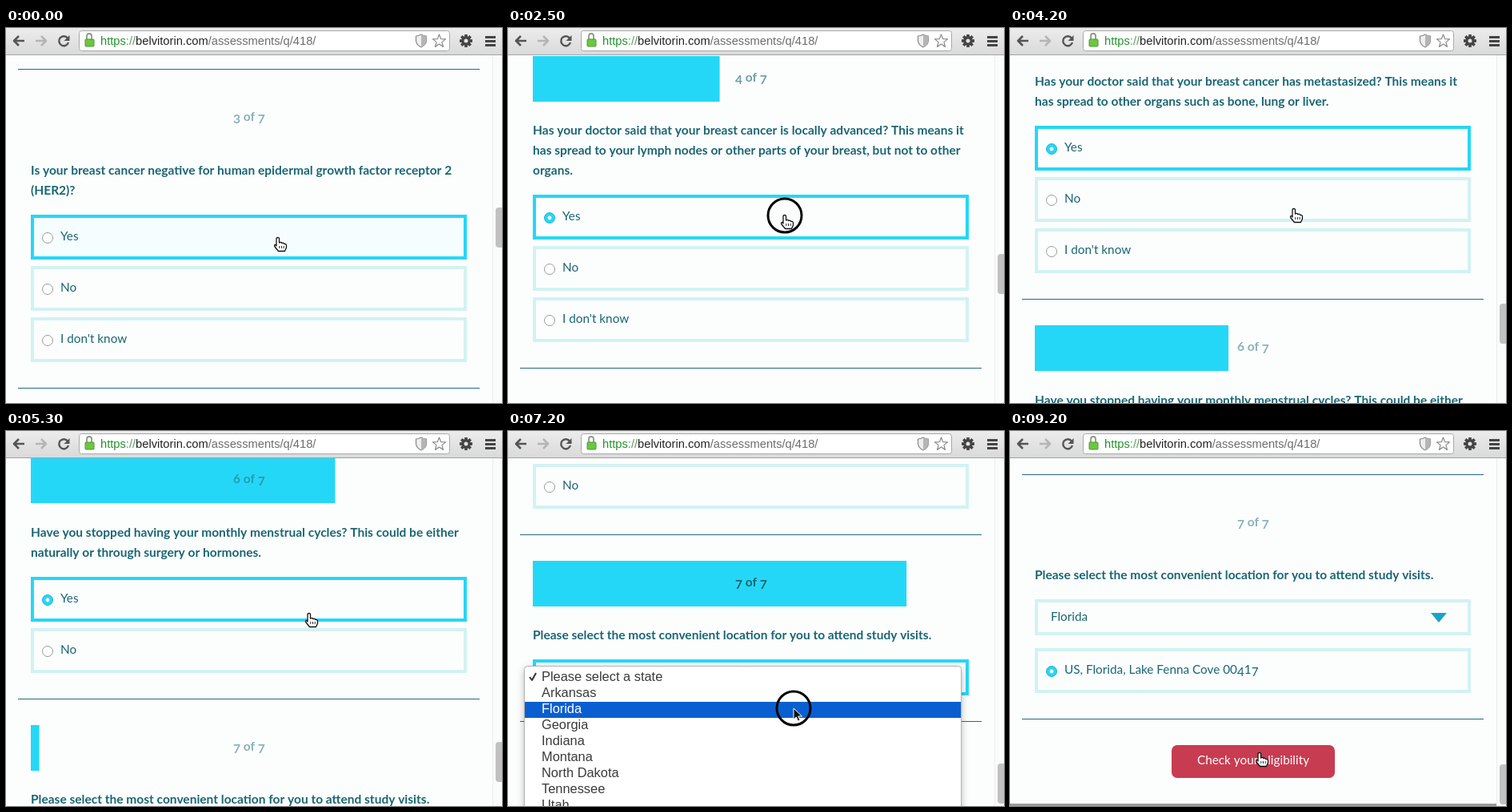
Animation, 620 px wide and 468 px high, one loop 9300 ms. Source, as an HTML page with a canvas:

```html
<!DOCTYPE html>
<html lang="en">
<head>
<meta charset="utf-8">
<title>Screening form</title>
<style>
html, body { margin: 0; width: 100%; height: 100%; overflow: hidden; background: #fcfefe; }
canvas { display: block; }
</style>
</head>
<body>
<canvas id="stage" width="620" height="468"></canvas>
<script>
const c = document.getElementById('stage').getContext('2d');
const LOOP = 9300, STEP = 100;
const TEAL = '#1a6572', CYAN = '#25d7f7', PAPER = '#fcfefe';
const BOLD = 'bold 15.53px Lato, sans-serif', BODY = '15.3px Lato, sans-serif';
const SYSTEM = '16.4px "Liberation Sans", Arial, sans-serif';
const URL_FONT = '14.7px "Liberation Sans", Arial, sans-serif';
const LINE = 24.8;

const sections = [
  { no: 3, y: 51, answers: 3, text: ['Is your breast cancer negative for human epidermal growth factor receptor 2', '(HER2)?'] },
  { no: 4, y: 448.6, answers: 3, text: ['Has your doctor said that your breast cancer is locally advanced? This means it',
    'has spread to your lymph nodes or other parts of your breast, but not to other', 'organs.'] },
  { no: 5, y: 871, answers: 3, text: ['Has your doctor said that your breast cancer has metastasized? This means it',
    'has spread to other organs such as bone, lung or liver.'] },
  { no: 6, y: 1269, answers: 2, text: ['Have you stopped having your monthly menstrual cycles? This could be either',
    'naturally or through surgery or hormones.'] },
  { no: 7, y: 1602.6, answers: 0, text: ['Please select the most convenient location for you to attend study visits.'] }
];
const answers = ['Yes', 'No', "I don't know"];
const states = ['Please select a state', 'Arkansas', 'Florida', 'Georgia', 'Indiana', 'Montana', 'North Dakota', 'Tennessee', 'Utah'];

// Timeline in ms
const answered = [400, 2400, 3800, 5100, 8200];
const scrollStops = [0, 447, 870, 1269, 1474, 1549];
const OPEN = 6600, CLOSE = 7300;
const clicks = [...answered, 6500, 7200];
const pointer = [[0, 340, 262], [1300, 340, 262], [1600, 346, 234], [3300, 346, 234], [3600, 355, 226],
  [4700, 355, 226], [4900, 379, 228], [6000, 379, 228], [6400, 360, 306], [6600, 360, 306],
  [6900, 357, 346], [7400, 357, 346], [7900, 350, 370], [8400, 350, 370], [9100, 312, 402]];

const ramp = (t, start, length) => {
  const p = Math.min(1, Math.max(0, (t - start) / length));
  return 0.5 - Math.cos(Math.PI * p) / 2;
};

function pointerAt(t) {
  let [, x, y] = pointer[0];
  for (let i = 1; i < pointer.length; i++) {
    const [t0, x0, y0] = pointer[i - 1], [t1, x1, y1] = pointer[i];
    const p = ramp(t, t0, t1 - t0);
    x += (x1 - x0) * p;
    y += (y1 - y0) * p;
  }
  return [x, y];
}

function mix(a, b, p) {
  return 'rgb(' + a.map((v, i) => Math.round(v + (b[i] - v) * p)).join() + ')';
}

function rect(x, y, w, h, fill) {
  c.fillStyle = fill;
  c.fillRect(x, y, w, h);
}

function round(x, y, w, h, r, fill, stroke) {
  c.beginPath();
  c.roundRect(x, y, w, h, r);
  if (fill) { c.fillStyle = fill; c.fill(); }
  if (stroke) { c.strokeStyle = stroke; c.stroke(); }
}

function disc(x, y, r, fill, stroke, width = 1) {
  c.beginPath();
  c.arc(x, y, r, 0, 7);
  if (fill) { c.fillStyle = fill; c.fill(); }
  if (stroke) { c.strokeStyle = stroke; c.lineWidth = width; c.stroke(); }
}

function text(s, x, y, font, fill = TEAL) {
  c.font = font;
  c.fillStyle = fill;
  c.fillText(s, x, y);
  return x + c.measureText(s).width;
}

// Old-style figures: some digits hang below the baseline
function oldStyle(s, x, y, font) {
  for (const part of s.split(/([34579])/)) {
    x = text(part, x, /^[34579]$/.test(part) ? y + 3 : y, font);
  }
}

// Path data drawn at an offset
function shape(d, x, y, fill, stroke, width = 1) {
  const path = new Path2D(d);
  c.save();
  c.translate(x, y);
  c.lineJoin = 'round';
  if (fill) { c.fillStyle = fill; c.fill(path); }
  if (stroke) { c.strokeStyle = stroke; c.lineWidth = width; c.stroke(path); }
  c.restore();
}

function frame(y, h, glow) {
  c.strokeStyle = mix([210, 242, 243], [37, 215, 247], glow);
  c.lineWidth = 4;
  c.strokeRect(33, y + 2, 541, h - 4);
}

function option(label, y, glow, checked) {
  if (!checked) rect(35, y + 4, 537, 48, mix([252, 254, 254], [245, 253, 254], glow));
  frame(y, 56, glow);
  if (checked) {
    disc(52, y + 29, 6.5, CYAN, '#1fb4d6');
    disc(52, y + 29, 2.4, '#f4fdff');
  } else {
    disc(52, y + 29, 6.5, '#fff', '#9a9a9a');
  }
  oldStyle(label, 68, y + 32, BODY);
}

const rule = y => rect(15, y, 577, 1, '#2a6780');

function section(s, i, t) {
  const first = i === 0, prev = first ? 0 : answered[i - 1], done = answered[i];
  const y = Math.round(s.y), top = Math.round(s.y + 132 + LINE * s.text.length);
  rule(y);
  if (!first) {
    const size = ramp(t, prev + 160, 415) - ramp(t, done + 160, 415);
    rect(31, y + 33, 545 * (s.no - 1) / 7 * size, 57, CYAN);
    c.globalAlpha = 0.5 + 0.5 * (ramp(t, prev + 600, 250) - ramp(t, done, 150));
  } else {
    c.globalAlpha = 0.5;
  }
  oldStyle(s.no + ' of 7', 284, y + 65, BOLD);
  c.globalAlpha = 1;
  s.text.forEach((line, k) => text(line, 31, top - 25 * (s.text.length - k), BOLD));

  const glow = (first ? 1 : ramp(t, prev + 540, 300)) - ramp(t, done + 700, 200);
  for (let k = 0; k < s.answers; k++) {
    option(answers[k], top + 64 * k, k ? 0 : glow, !k && t >= done + 100);
  }
}

function locationForm(t) {
  const top = 1759, grown = ramp(t, 7400, 400), end = 1836 + 72 * grown;
  frame(top, 45, ramp(t, 6200, 200) - ramp(t, 7700, 200));
  text(t < CLOSE ? states[0] : states[2], 51, top + 27, BODY);
  shape('M0 0H20L10 12Z', 526, top + 17, '#1ba3c6');
  c.globalAlpha = grown;
  if (grown) option('US, Florida, Lake Fenna Cove 00417', top + 61, ramp(t, 7700, 200) - ramp(t, 8400, 200), t >= 8300);
  c.globalAlpha = 1;
  rule(end);
  round(202, end + 33, 204, 41, 7, t >= 9200 ? '#c73c50' : '#d5455a');
  c.textAlign = 'center';
  text('Check your eligibility', 304, end + 57, BODY, '#fff');
  c.textAlign = 'left';
  rect(0, end + 106, 608, 3, '#9b9b9b');
}

function popup(t) {
  c.save();
  c.shadowColor = 'rgba(0,0,0,.3)';
  c.shadowBlur = 8;
  c.shadowOffsetY = 3;
  round(20.5, 293.5, 546, 200, 4, '#fff');
  c.restore();
  c.lineWidth = 1;
  round(20.5, 293.5, 546, 200, 4, null, '#b4b4b4');
  const picked = Math.max(0, Math.min(2, Math.floor((pointerAt(t)[1] - 298) / 20)));
  rect(21, 298 + 20 * picked, 545, 20, '#0a5fd0');
  states.forEach((s, k) => text(s, 42, 312 + 20 * k, SYSTEM, k === picked ? '#fff' : '#3a3a3a'));
  shape('M0 5L3 9L8 0', 27, 302, null, picked ? '#333' : '#fff', 2);
}

function toolbar() {
  const g = c.createLinearGradient(0, 0, 0, 33);
  g.addColorStop(0, '#ececec');
  g.addColorStop(1, '#dadada');
  rect(0, 0, 620, 33, g);
  rect(0, 33, 620, 1, '#a3a3a3');
  const arrow = 'M14 6H1M7 0L1 6L7 12';
  shape(arrow, 9, 10, null, '#555', 2.6);
  c.save();
  c.translate(51, 10);
  c.scale(-1, 1);
  shape(arrow, 0, 0, null, '#b5b5b5', 2.6);
  c.restore();
  shape('M5 -3.5A6 6 0 1 0 6 2', 72, 16, null, '#555', 2.4);
  shape('M7.5 -7V0H.5Z', 72, 16, '#555');
  c.lineWidth = 1;
  round(91.5, 3.5, 463, 25, 3, '#fff', '#a9a9a9');
  shape('M-3 0V-4A3 3 0 0 1 3 -4V0', 104, 14, null, '#8a9a86', 1.8);
  round(99, 14, 11, 9, 1, '#6cc644', '#4c9a2e');
  let x = text('https', 118, 21, URL_FONT, '#24912c');
  x = text('://', x, 21, URL_FONT, '#5a9c5e');
  x = text('belvitorin.com', x, 21, URL_FONT, '#222');
  text('/assessments/q/418/', x, 21, URL_FONT, '#6d6d6d');
  shape('M0 -8Q3 -6 6.5 -6V0Q6 5 0 8Q-6 5 -6.5 0V-6Q-3 -6 0 -8Z', 519, 16, '#eee', '#888', 1.2);
  shape('M0 -8V8Q6 5 6.5 0V-6Q3 -6 0 -8Z', 519, 16, '#b5b5b5');
  let star = '';
  for (let k = 0; k < 10; k++) {
    const r = k % 2 ? 3.6 : 8.5, a = Math.PI * (k / 5 - 0.5);
    star += (k ? 'L' : 'M') + r * Math.cos(a) + ' ' + r * Math.sin(a);
  }
  shape(star + 'Z', 541.5, 16.5, '#fff', '#888', 1.2);
  for (let k = 0; k < 8; k++) {
    c.save();
    c.translate(575, 16);
    c.rotate(k * Math.PI / 4);
    rect(-1.8, -8, 3.6, 5, '#444');
    c.restore();
  }
  disc(575, 16, 4.2, null, '#444', 3.4);
  for (let k = 0; k < 3; k++) rect(599, 10 + 5 * k, 13, 3, '#444');
}

function cursor(t) {
  const [x, y] = pointerAt(t);
  if (clicks.some(k => t >= k && t < k + 200)) disc(x, y, 21, null, '#000', 3);
  if (t >= OPEN && t < CLOSE) {
    shape('M0 0V14L3.3 11L5.5 16L8 15L5.8 10H10.5Z', x, y, '#111', '#fff');
  } else {
    shape('M-2 9V1Q-2 -.5 0 -.5Q1.5 -.5 1.5 1V6Q4 4.5 4.8 6.6Q7 5.5 7.8 7.5Q10.5 7 10.5 9.5V12L8.5 16.5H.5L-4 11Q-5 9 -3.6 8.4Q-2.6 8.4 -2 10Z', x, y, '#fff', '#111', 1.3);
    shape('M1.8 10V13M4.5 10V13M7.2 10V13', x, y, null, '#111', 0.9);
  }
}

function draw(t) {
  const scroll = answered.reduce((y, at, i) =>
    y + (scrollStops[i + 1] - scrollStops[i]) * ramp(t, at + 331, 270), 0);
  rect(0, 0, 620, 468, PAPER);
  c.save();
  c.translate(0, -Math.round(scroll));
  sections.forEach((s, i) => section(s, i, t));
  locationForm(t);
  c.restore();
  rect(608, 34, 12, 434, '#fafbfb');
  rect(608, 34, 1, 434, '#ececec');
  round(612, Math.min(416, 224 + Math.round(scroll * 0.1293)), 10, 50, 4, '#c1c1c1');
  if (t >= OPEN && t < CLOSE) popup(t);
  toolbar();
  cursor(t);
}

const start = performance.now();
function tick() {
  const t = (performance.now() - start) % LOOP;
  draw(Math.floor(t / STEP) * STEP);
  requestAnimationFrame(tick);
}
tick();
</script>
</body>
</html>
```
